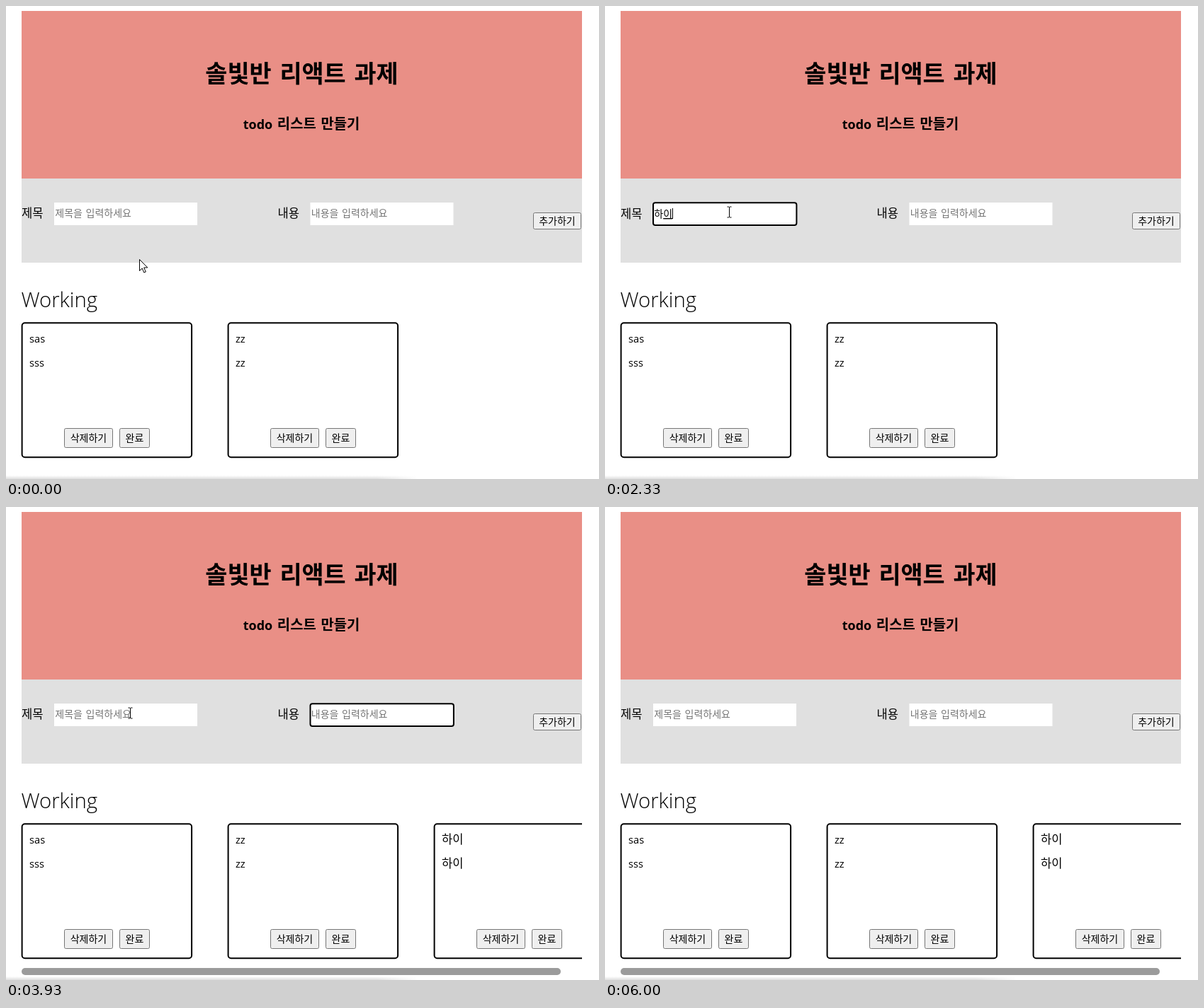
Animation, 837 px wide and 669 px high, one loop 6390 ms. Source, as an HTML page:

```html
<!DOCTYPE html>
<html lang="ko">
<head>
<meta charset="utf-8">
<title>todo 리스트</title>
<style>
  html, body { margin: 0; width: 100%; height: 100%; overflow: hidden; background: #fff; }
  svg { display: block; }
  text { font: 350 14px "Open Sans", "Noto Sans CJK KR", "Noto Sans CJK", sans-serif; word-spacing: 1px; }
  .mid { text-anchor: middle; }
  .title { font-size: 33.8px; font-weight: 700; word-spacing: 3px; }
  .subtitle { font-size: 19.9px; font-weight: 700; word-spacing: 1.5px; }
  .label { font-size: 16.6px; }
  .heading { font-size: 29.3px; }
  .latin { font-size: 14.7px; font-weight: 400; }
  .hint { fill: #757575; }
  .button rect { fill: #efefef; stroke: #767676; }
  .ring, .card > rect { fill: #fff; stroke: #000; stroke-width: 2; }
</style>
</head>
<body>
<svg id="stage" width="837" height="669" viewBox="0 0 837 669">
  <defs>
    <linearGradient id="shade" x2="0" y2="1">
      <stop stop-color="#fff"/><stop offset="1" stop-color="#dedede"/>
    </linearGradient>
    <linearGradient id="fade">
      <stop offset=".9" stop-color="#fff" stop-opacity="0"/><stop offset="1" stop-color="#fff"/>
    </linearGradient>
    <clipPath id="page"><rect width="813" height="669"/></clipPath>
  </defs>
  <rect x="22" y="7" width="791" height="237" fill="#e98f86"/>
  <text class="title mid" x="417.5" y="108">솔빛반 리액트 과제</text>
  <text class="subtitle mid" x="417" y="174"><tspan font-size="18">todo</tspan> 리스트 만들기</text>
  <rect x="22" y="244" width="791" height="119" fill="#e0e0e0"/>
  <g id="form"></g>
  <text class="heading" x="21.5" y="426">Working</text>
  <g id="cards" clip-path="url(#page)"></g>
  <rect id="scrollbar" x="22" y="652" width="761" height="10" rx="5" fill="#9b9b9b"/>
  <rect y="664" width="580" height="5" fill="url(#shade)"/>
  <rect y="664" width="581" height="5" fill="url(#fade)"/>
  <path id="arrow" d="M.5 .5V16.5L4.2 13L6.8 19L9.3 18L6.7 12H11.8Z" fill="#fff" stroke="#000"/>
  <path id="beam" d="M-3 -7.5H-1L0 -7L1 -7.5H3M-3 7.5H-1L0 7L1 7.5H3M0 -7V7" fill="none" stroke="#000"/>
</svg>
<script>
const LOOP = 6390, TICK = 1000 / 15;
const byId = id => document.getElementById(id);
const show = (el, on) => el.setAttribute('visibility', on ? 'visible' : 'hidden');

const button = (x, y, w, h, label) => `<g class="button">
  <rect x="${x + .5}" y="${y + .5}" width="${w - 1}" height="${h - 1}" rx="2"/>
  <text class="mid" x="${x + w / 2}" y="${y + h / 2 + 5}">${label}</text></g>`;

const field = (x, name, hint) => `<g class="field">
  <text class="label" x="${x - 46}">${name}</text>
  <rect x="${x}" y="278" width="202" height="32" fill="#fff"/>
  <rect class="ring" x="${x}" y="278.3" width="202.4" height="31.7" rx="3"/>
  <text class="hint" x="${x + 1.3}" y="298">${hint}</text>
  <text class="value" x="${x + 1.3}"><tspan></tspan><tspan text-decoration="underline"></tspan></text>
  <rect class="caret" y="286" width="1" height="15"/></g>`;

const card = (x, title, body, kind) => `<g class="card">
  <rect x="${x + .6}" y="448.3" width="239.5" height="190" rx="4"/>
  <text class="${kind}" x="${x + 11}" y="476">${title}</text>
  <text class="${kind}" x="${x + 11}" y="510">${body}</text>
  ${button(x + 60, 597, 69, 28, '삭제하기')}${button(x + 138, 597, 43, 28, '완료')}</g>`;

byId('form').innerHTML = field(68, '제목', '제목을 입력하세요')
  + field(429.5, '내용', '내용을 입력하세요') + button(744, 292, 68, 24, '추가하기');
byId('cards').innerHTML = card(22, 'sas', 'sss', 'latin')
  + card(313, 'zz', 'zz', 'latin') + card(604, '하이', '하이', 'label');

const fields = [...document.querySelectorAll('.field')].map((group, i) => {
  const pick = selector => group.querySelector(selector);
  return { left: [70, 431.5][i], label: pick('.label'), ring: pick('.ring'), hint: pick('.hint'),
    value: pick('.value'), parts: group.querySelectorAll('tspan'), caret: pick('.caret') };
});
const newCard = byId('cards').lastElementChild;

// Each value is [committed text, text still being composed].
const EMPTY = ['', ''];
const events = [
  [0, { focus: -1, caret: true, values: [EMPTY, EMPTY], added: false }],
  [400, { focus: 0 }],
  [600, { values: [['g', ''], EMPTY] }],
  [1400, { caret: false }],
  [1600, { caret: true, values: [['g', 'ㅎ'], EMPTY] }],
  [1730, { values: [['g', '하'], EMPTY] }],
  [1870, { values: [EMPTY, EMPTY] }],
  [1930, { values: [['', 'ㅎ'], EMPTY] }],
  [2000, { values: [['', '하'], EMPTY] }],
  [2130, { values: [['', '항'], EMPTY] }],
  [2200, { values: [['하', '이'], EMPTY] }],
  [2400, { focus: 1, values: [['하이', ''], EMPTY] }],
  [2730, { values: [['하이', ''], ['', '하']] }],
  [3000, { values: [['하이', ''], ['', '항']] }],
  [3130, { values: [['하이', ''], ['하', '이']] }],
  [3400, { values: [['하이', ''], ['하이', '']] }],
  [3730, { values: [EMPTY, EMPTY] }],
  [3930, { added: true, caret: false }],
  [4400, { caret: true }],
  [4870, { caret: false }],
  [5400, { caret: true }],
  [5930, { focus: -1 }],
];

const steps = (t, start, count) =>
  Math.min(1, Math.max(0, Math.floor((t - start + 4) / TICK) + 1) / count);

function pointer(t) {
  const enter = steps(t, 70, 6), leave = steps(t, 4870, 9);
  const ease = enter * (2 - enter);
  const x = 188 - 13 * ease + 110 * leave;
  const y = 358 - 67 * ease + (t >= 4400 ? 2 : 0) + 385 * leave * leave;
  return [x, y];
}

function drawField(f, [done, composing], focused, caretOn) {
  const filled = done + composing !== '';
  const shift = /[ㄱ-힣]/.test(done + composing) ? 1 : 0;
  f.label.setAttribute('y', 299 + shift);
  f.value.setAttribute('y', 298 + shift);
  f.parts[0].textContent = done;
  f.parts[1].textContent = composing;
  show(f.hint, !filled);
  show(f.ring, focused);
  show(f.caret, focused && caretOn);
  const width = filled ? f.value.getComputedTextLength() : -1;
  f.caret.setAttribute('x', Math.floor(f.left + width));
}

function frame() {
  const t = performance.now() % LOOP;
  const state = Object.assign({}, ...events.filter(([at]) => at <= t).map(e => e[1]));
  fields.forEach((f, i) => drawField(f, state.values[i], state.focus === i, state.caret));
  show(newCard, state.added);
  show(byId('scrollbar'), state.added);

  const [x, y] = pointer(t);
  const overInput = x > 68 && x < 270 && y > 278 && y < 310;
  const place = `translate(${Math.round(x)} ${Math.round(y)})`;
  byId('arrow').setAttribute('transform', place);
  byId('beam').setAttribute('transform', place + ' translate(.5 .5)');
  show(byId('arrow'), !overInput);
  show(byId('beam'), overInput);
  requestAnimationFrame(frame);
}
frame();
</script>
</body>
</html>
```
